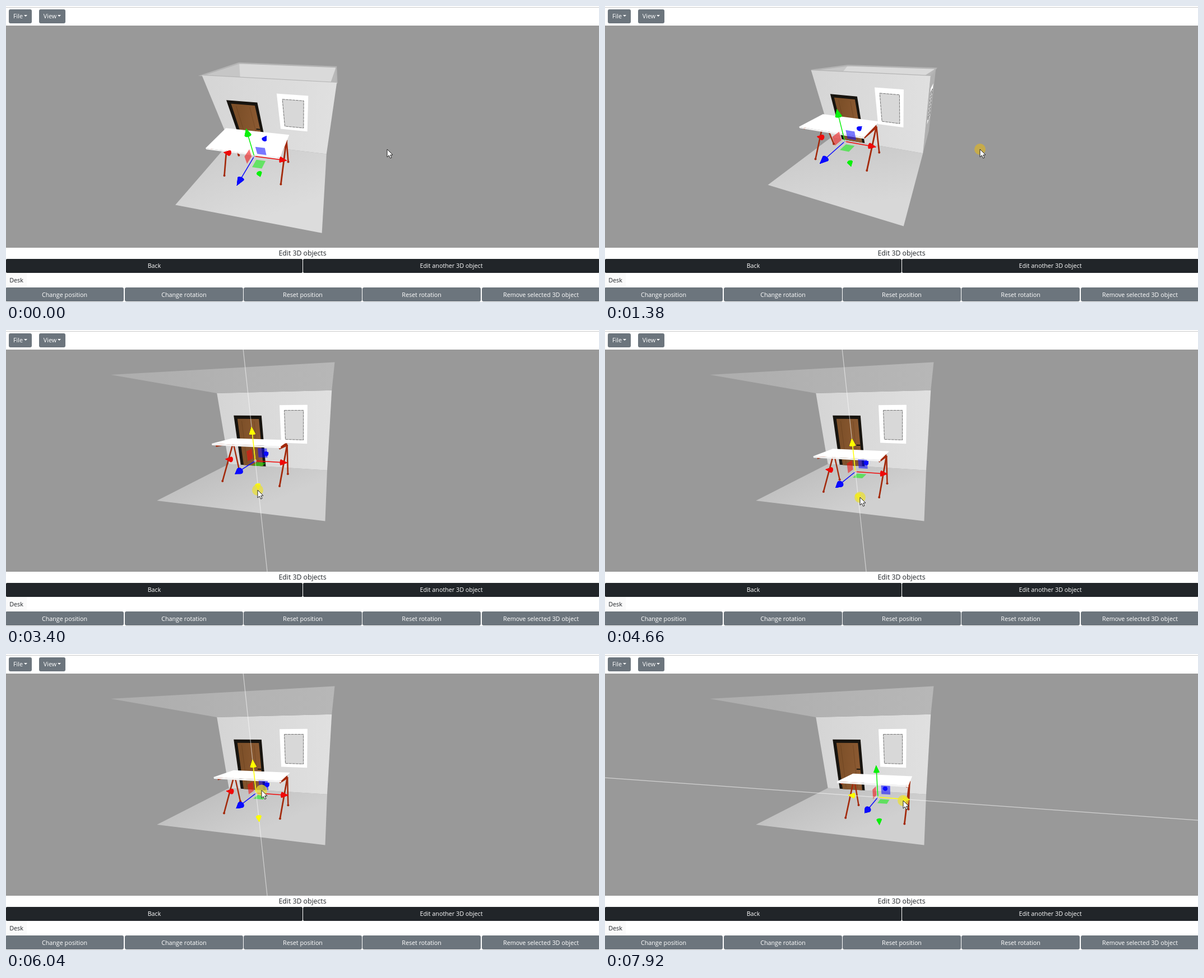
These frames come from a looping animation (1058 px wide and 529 px high, 8 s). An HTML page with a canvas:

```html
<!DOCTYPE html>
<html lang="en">
<head>
<meta charset="utf-8">
<title>3D room editor</title>
<style>
html, body { margin: 0; width: 100%; height: 100%; overflow: hidden; background: #fff; }
body { font: 10.75px "Open Sans", "Noto Sans", sans-serif; color: #212529; }
canvas { position: absolute; left: 0; top: 35px; }
div { position: absolute; text-align: center; white-space: nowrap; }
.btn { background: #6c757d; color: #fff; border-radius: 3px; height: 25px; line-height: 26px; top: 503px; width: 211px; }
.menu { top: 6px; line-height: 25px; }
.menu::after { content: ""; display: inline-block; margin-left: 2px; vertical-align: 3px; border: 3px solid transparent; border-top-color: #fff; border-bottom: 0; }
.dark { background: #212529; top: 452px; width: 529px; border-radius: 2px; line-height: 25px; }
</style>
</head>
<body>
<div style="left:0;top:2px;width:1058px;height:1px;background:#c9c9c9"></div>
<div class="btn menu" style="left:5px;width:41px">File</div>
<div class="btn menu" style="left:59px;width:47px">View</div>
<canvas id="view" width="1058" height="397"></canvas>
<div style="left:0;width:1058px;top:432px;line-height:19px;font-size:12.27px">Edit 3D objects</div>
<div class="btn dark" style="left:0">Back</div>
<div class="btn dark" style="left:530px">Edit another 3D object</div>
<div style="left:0;top:477px;width:37px;height:25px;line-height:26px;background:#fafafa">Desk</div>
<div class="btn" style="left:-1px">Change position</div>
<div class="btn" style="left:212px">Change rotation</div>
<div class="btn" style="left:424px">Reset position</div>
<div class="btn" style="left:636px">Reset rotation</div>
<div class="btn" style="left:849px">Remove selected 3D object</div>
<script>
const g = document.getElementById('view').getContext('2d');
const LOOP = 8000, STEP = 125.9, START = 740;
const FOCAL = 258.7, CX = 529, CY = 233.5;      // 75 degree field of view
const TARGET = [2.2, .03, -.63], RADIUS = 4.7;  // orbit centre and distance
const AXES = { x: [1, 0, 0], y: [0, 1, 0], z: [0, 0, 1] };

// step, yaw, pitch
const orbit = [[0, 9.7, 38.4], [5, 16.2, 31.7], [7, 12, 22.2], [9, 10, 18.3]];
// step, x, y
const pointer = [[0, 680, 256], [5, 669, 256], [8, 659, 258], [11, 470, 210], [12, 432, 223], [14, 448, 248],
  [18, 448, 248], [19, 448, 256], [21, 449, 286], [24, 458, 401], [25, 450, 329], [28, 450, 329], [30, 458, 401],
  [32, 452, 197], [36, 454, 124], [38, 454, 127], [46, 458, 360], [47, 458, 350], [50, 506, 255], [53, 490, 258],
  [57, 532, 262]];

const mix = (a, b, k) => a.map((v, i) => v + (b[i] - v) * k);
const add = (p, v, k = 1) => p.map((c, i) => c + v[i] * k);
const sub = (a, b) => add(a, b, -1);
const dot = (a, b) => a.reduce((s, v, i) => s + v * b[i], 0);
const gray = v => `rgb(${v},${v},${v})`;

function track(keys, t) {
  const i = keys.findIndex(k => k[0] > t);
  if (i < 0) return keys[keys.length - 1].slice(1);
  const a = keys[i - 1], b = keys[i];
  return mix(a, b, (t - a[0]) / (b[0] - a[0])).slice(1);
}

let eye, right, up, ahead;
function aim(yaw, pitch) {
  const [s, c, sp, cp] = [Math.sin, Math.cos].map(f => f).length && [
    Math.sin(yaw), Math.cos(yaw), Math.sin(pitch), Math.cos(pitch)];
  ahead = [-s * cp, -sp, -c * cp];
  right = [c, 0, -s];
  up = [-s * sp, cp, -c * sp];
  eye = add(TARGET, ahead, -RADIUS);
}
const depth = p => dot(sub(p, eye), ahead);
function project(p) {
  const d = sub(p, eye), k = FOCAL / depth(p);
  return [CX + dot(d, right) * k, CY - dot(d, up) * k];
}
// point under the mouse on the plane of constant z
function pick([x, y], z) {
  const ray = add(add(ahead, right, (x - CX) / FOCAL), up, (CY - y) / FOCAL);
  return add(eye, ray, (z - eye[2]) / ray[2]);
}

const plane = (o, a, b) => (u, v) => project(add(add(o, a, u), b, v));
const quad = (p, l = 0, t = 0, r = 1, b = 1) => [p(l, t), p(r, t), p(r, b), p(l, b)];
const area = q => q.reduce((s, p, i) => {
  const n = q[(i + 1) % q.length];
  return s + p[0] * n[1] - n[0] * p[1];
}, 0) / 2;

function path(q) {
  g.beginPath();
  q.forEach(p => g.lineTo(...p));
}
function fill(q, color) {
  path(q);
  g.fillStyle = color;
  g.fill();
}
function line(q, color, width) {
  path(q);
  g.strokeStyle = color;
  g.lineWidth = width;
  g.stroke();
}
function disc(p, r, color) {
  g.beginPath();
  g.arc(...p, r, 0, 7);
  g.fillStyle = color;
  g.fill();
}
function shade(a, b, c0, c1) {
  const s = g.createLinearGradient(...a, ...b);
  s.addColorStop(0, c0);
  s.addColorStop(1, c1);
  return s;
}

function drawWindow(p) {
  fill(quad(p), '#fff');
  const pane = quad(p, .17, .13, .86, .9);
  fill(pane, '#d8d8d8');
  g.setLineDash([5, 1]);
  line([...pane, pane[0]], '#666', .9);
  g.setLineDash([]);
}

function drawDoor(p) {
  fill(quad(p), '#17140f');
  fill(quad(p, .12, .06, .9, 1), shade(p(.12, .5), p(.9, .5), '#7d5029', '#8c5a32'));
  for (const u of [.27, .72]) line([p(u, .1), p(u, .96)], 'rgba(70,38,14,.25)', 1);
  line([p(.76, .56), p(.9, .56)], '#17140f', 2);
}

function drawRoom() {
  const wall = plane([0, 2, 0], [3, 0, 0], [0, -2, 0]);
  const floor = plane([0, 0, 0], [3, 0, 0], [0, 0, 2]);
  const ceiling = plane([0, 2, 2], [3, 0, 0], [0, 0, -2]);
  const side = plane([3, 2, 0], [0, 0, -1.3], [0, -2, 0]);
  const rear = plane([0, 2, -1.3], [3, 0, 0], [0, 0, 1.3]);
  if (area(quad(side)) > 0) {
    fill(quad(side), '#b0b0b0');
    drawWindow(plane([3, 1.67, -.35], [0, 0, -.6], [0, -.95, 0]));
  }
  const rim = [rear(.067, 0), rear(1, 0), rear(1, 1), rear(0, 1)];
  if (area(rim) > 0) {
    fill(rim, '#dadada');
    fill([rim[3], rim[0], rear(.31, 1)], '#c6c6c6');
    fill([rim[1], rim[2], rear(.96, 1)], '#b8b8b8');
    line([...rim, rim[0]], '#b4b4b4', 2.5);
  }
  const light = 180 + eye[1] * 8;
  fill(quad(floor), shade(floor(0, 0), floor(.6, 1), gray(light), gray(light + 16)));
  fill(quad(wall), shade(wall(0, 0), wall(1, 0), '#d5d5d5', '#e0e0e0'));
  if (area(quad(ceiling)) > 0) fill(quad(ceiling), shade(ceiling(0, 0), ceiling(1, 0), '#adadad', '#b7b7b7'));
  drawDoor(plane([.4, 1.435, 0], [.81, 0, 0], [0, -1.435, 0]));
  drawWindow(plane([1.72, 1.69, 0], [.715, 0, 0], [0, -.965, 0]));
}

function drawTrestles(pos) {
  const red = '#a32a0c', at = (...v) => add(pos, v);
  const rod = (a, b, w) => line([project(a), project(b)], red, w * FOCAL / depth(mix(a, b, .5)));
  rod(at(-.6, .3, -.24), at(.6, .3, -.24), .06);
  for (const x of [-.6, .6]) {
    const apex = at(x, .3, -.24);
    rod(apex, at(x, .34, .26), .045);
    for (const z of [-.283, .283]) {
      const foot = at(x * .97, -.36, z);
      rod(apex, foot, .03);
      disc(project(foot), 2, red);
    }
  }
}

function drawDesk(pos) {
  const slab = y => quad(plane(add(pos, [-.645, y, -.295]), [1.29, 0, 0], [0, 0, .59]));
  const above = area(slab(.385)) > 0;
  if (above) drawTrestles(pos);
  fill(slab(above ? .385 : .355), '#fff');
  fill(quad(plane(add(pos, [-.645, .385, .295]), [1.29, 0, 0], [0, -.03, 0])), '#f4f4f4');
  if (!above) drawTrestles(pos);
}

function drawCone(pos, axis, size, color) {
  const [a, b] = Object.values(AXES).filter(v => !dot(v, axis));
  const tip = project(add(pos, axis, size)), base = add(pos, axis, size * .8), ring = [];
  for (let i = 0; i < 16; i++) {
    const t = i * Math.PI / 8, r = size * .085;
    ring.push(project(add(add(base, a, Math.cos(t) * r), b, Math.sin(t) * r)));
  }
  fill(ring, color);
  ring.forEach((p, i) => fill([tip, p, ring[(i + 5) % 16]], color));
}

function drawGizmo(pos, active) {
  const size = .218 * Math.hypot(...sub(pos, eye)), c = project(pos);
  const colors = { x: '#f00a0a', y: '#0af00a', z: '#0a0aff' };
  for (const [a, b, color] of ['xyz', 'yzx', 'zxy'].map(s => [AXES[s[0]], AXES[s[1]], colors[s[2]]])) {
    const handle = quad(plane(pos, a.map(v => v * size), b.map(v => v * size)), .12, .12, .4, .4);
    if (Math.abs(area(handle)) < 25) continue;
    g.globalAlpha = .55;
    fill(handle, color);
    g.globalAlpha = 1;
  }
  if (active) {
    colors[active] = '#ffff00';
    const d = sub(project(add(pos, AXES[active], .1)), c);
    line([add(c, d, -150), add(c, d, 150)], 'rgba(255,255,255,.55)', 1.2);
  }
  for (const name in AXES) {
    const axis = AXES[name];
    line([c, project(add(pos, axis, size * .85))], colors[name], 1.5);
    drawCone(pos, axis.map(v => -v), size, colors[name]);
    drawCone(pos, axis, size, colors[name]);
  }
  disc(c, 2.5, 'rgba(230,230,230,.6)');
}

function drawPointer(tip, press) {
  if (press) disc(tip, 10, press);
  const arrow = [[0, 0], [0, 14], [3.2, 11], [5.6, 16], [8, 15], [5.7, 10.2], [10, 10]].map(p => add(tip, p));
  fill(arrow, '#fff');
  line([...arrow, arrow[0]], '#222', 1);
}

function draw(now) {
  const n = Math.max(0, Math.floor((now % LOOP - START) / STEP));
  const [yaw, pitch] = track(orbit, n).map(v => v * Math.PI / 180), mouse = track(pointer, n);
  aim(yaw, pitch);

  // the desk follows the held arrow and stops at the floor
  const desk = [1.57, .91, 1.225], hand = pick(mouse, desk[2]);
  if (n >= 19) desk[1] = n < 47 ? Math.max(.36, hand[1] + (n < 30 ? .66 : -.07)) : .36;
  if (n >= 53) desk[0] = hand[0] - .51;
  const active = n === 11 || n >= 52 ? 'x' : n >= 14 && n <= 47 ? 'y' : '';
  const press = n >= 1 && n <= 7 ? 'rgba(214,178,50,.75)'
    : n >= 17 && n <= 46 || n >= 53 ? 'rgba(235,225,50,.72)' : '';

  g.setTransform(1, 0, 0, 1, 0, 0);
  g.fillStyle = '#999';
  g.fillRect(0, 0, 1058, 397);
  g.translate(0, -35);
  drawRoom();
  drawDesk(desk);
  drawGizmo(desk, active);
  drawPointer(mouse, press);
}

const begin = performance.now();
function tick() {
  draw(performance.now() - begin);
  requestAnimationFrame(tick);
}
tick();
</script>
</body>
</html>
```
